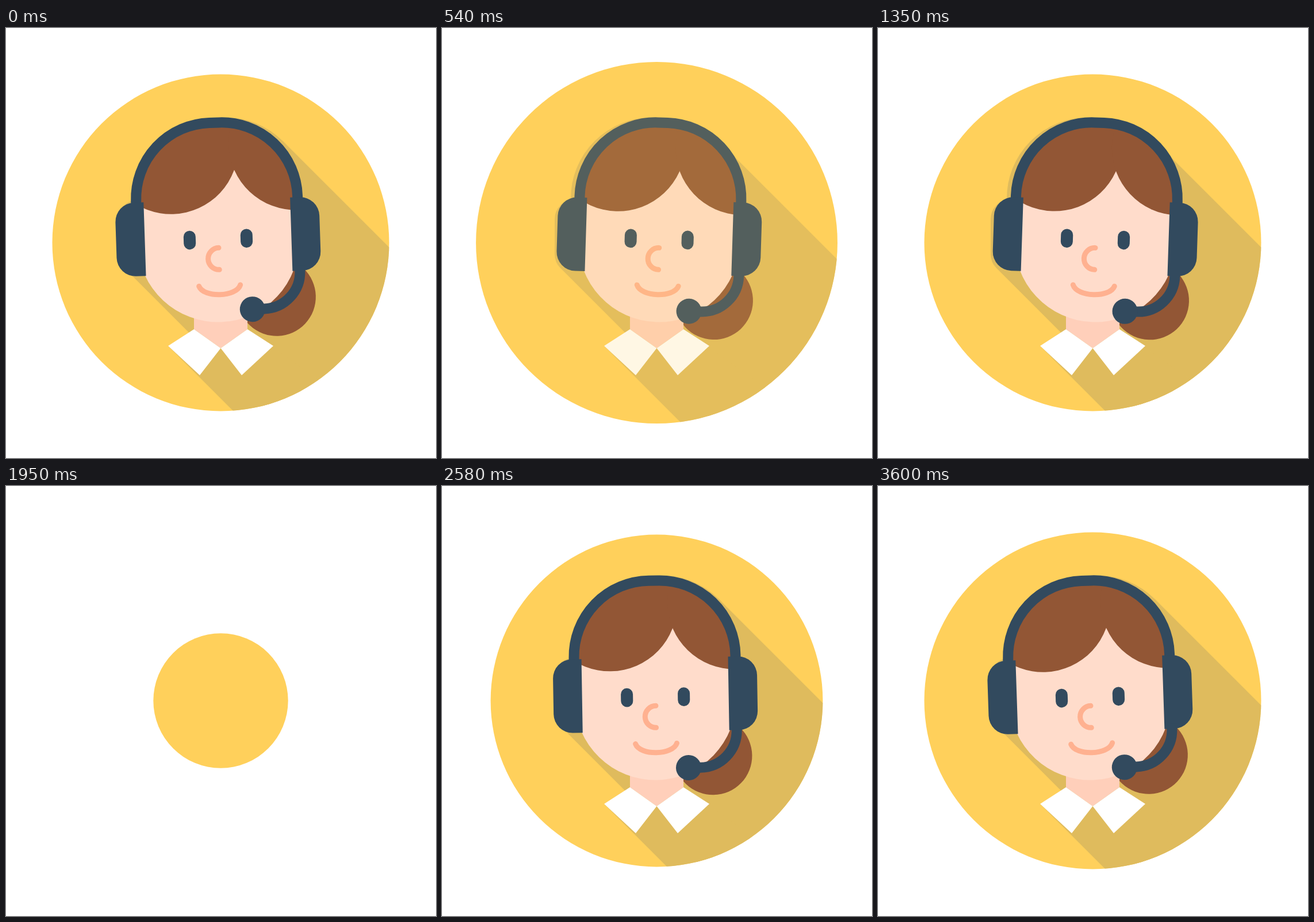
An HTML page with a canvas for the animation above (3.63 s loop, 748x748 px).

```html
<!DOCTYPE html>
<html lang="en">
<head>
<meta charset="utf-8">
<title>Support agent</title>
<style>
  html, body { margin: 0; width: 100%; height: 100%; overflow: hidden; background: #fff; }
  canvas { display: block; width: 748px; height: 748px; }
</style>
</head>
<body>
<canvas id="stage" width="748" height="748"></canvas>
<script>
const SIZE = 748, LOOP = 3630, CYCLE = 1800, STEP = 30;
const CX = 373.5, CY = 373.5, RADIUS = 293;
const NECK_PIVOT = 503, SWAY = 1.95 * Math.PI / 180;
const COLOR = {
  disc: '#ffd05b', shade: '#dfbb5d', skin: '#ffdccb', neck: '#ffcfba',
  blush: '#ffb190', hair: '#925635', navy: '#324a5e', white: '#fff'
};

const stage = document.getElementById('stage').getContext('2d');
const layer = document.createElement('canvas');
layer.width = layer.height = SIZE;
const g = layer.getContext('2d');

function circle(ctx, x, y, r, color) {
  ctx.beginPath();
  ctx.arc(x, y, r, 0, Math.PI * 2);
  ctx.fillStyle = color;
  ctx.fill();
}

function polygon(color, ...points) {
  g.beginPath();
  points.forEach(([x, y]) => g.lineTo(x, y));
  g.fillStyle = color;
  g.fill();
}

function stroke(color, width, cap, trace) {
  g.beginPath();
  trace();
  g.strokeStyle = color;
  g.lineWidth = width;
  g.lineCap = cap;
  g.stroke();
}

function traceBand(bottom) {
  g.moveTo(233, bottom);
  g.arc(365, 296.5, 132, Math.PI, Math.PI * 1.5);
  g.arc(382, 296.5, 132, Math.PI * 1.5, Math.PI * 2);
  g.lineTo(514, bottom);
}

function traceHead() {
  g.beginPath();
  traceBand(371);
  g.arc(CX, 371, 140.5, 0, Math.PI);
  g.closePath();
}

function earCups(color) {
  g.fillStyle = color;
  g.beginPath();
  g.roundRect(196, 299, 50, 128, [33, 0, 0, 33]);
  g.roundRect(501, 299, 50, 128, [0, 33, 33, 0]);
  g.fill();
}

function band(color) {
  stroke(color, 18, 'butt', () => traceBand(304));
}

// Silhouette at rest, stretched diagonally and cut off by the disc.
function drawShadow(radius) {
  g.save();
  g.beginPath();
  g.arc(CX, CY, radius, 0, Math.PI * 2);
  g.clip();
  traceHead();
  g.fillStyle = COLOR.shade;
  g.fill();
  band(COLOR.shade);
  earCups(COLOR.shade);
  polygon(COLOR.shade, [481.7, 196.8], [981.7, 696.8], [705.7, 917.3], [205.7, 417.3]);
  polygon(COLOR.shade, [282, 553], [782, 1053], [950, 900], [420, 524]);
  g.restore();
}

function drawFace() {
  traceHead();
  g.fillStyle = COLOR.skin;
  g.fill();
  g.save();
  g.clip();
  circle(g, 297, 204, 117, COLOR.hair);
  circle(g, 514, 204, 117, COLOR.hair);
  g.restore();

  for (const x of [324, 423]) {
    stroke(COLOR.navy, 21, 'round', () => {
      g.moveTo(x, 361.5);
      g.lineTo(x, 373.2);
    });
  }
  stroke(COLOR.blush, 9, 'round', () =>
    g.arc(374, 401.3, 19, -Math.PI / 2, Math.PI / 2, true));
  stroke(COLOR.blush, 9, 'round', () => {
    g.moveTo(337.5, 448);
    g.bezierCurveTo(345, 469, 402, 469, 409.5, 448);
  });
}

function drawHeadset() {
  band(COLOR.navy);
  earCups(COLOR.navy);
  stroke(COLOR.navy, 18, 'butt', () => {
    g.moveTo(514, 418);
    g.arc(450, 427, 64, 0, Math.PI / 2);
    g.lineTo(430, 491);
  });
  circle(g, 429.2, 491, 22, COLOR.navy);
}

function drawFigure(radius, angle) {
  g.clearRect(0, 0, SIZE, SIZE);
  drawShadow(radius);

  const rotate = draw => {
    g.save();
    g.translate(CX, NECK_PIVOT);
    g.rotate(angle);
    g.translate(-CX, -NECK_PIVOT);
    draw();
    g.restore();
  };
  rotate(() => circle(g, 472, 471, 68, COLOR.hair));
  polygon(COLOR.neck, [327, 480], [420, 480], [420, 524], [CX, 557], [327, 524]);
  polygon(COLOR.white, [282, 553], [327, 524], [CX, 557], [337, 604]);
  polygon(COLOR.white, [465, 553], [420, 524], [CX, 557], [410, 604]);
  rotate(() => {
    drawFace();
    drawHeadset();
  });
}

const clamp = v => Math.min(1, Math.max(0, v));
const smooth = u => u * u * (3 - 2 * u);
const ease = (age, start, end, from, to) =>
  from + (to - from) * smooth(clamp((age - start) / (end - start)));

// Steady growth that runs past full size, dips below it and settles.
function popScale(age) {
  if (age < 300) return age / 300;
  if (age < 420) {
    const u = (age - 300) / 120;
    return 1 + 0.4 * u * (1 - u) ** 2 + 0.125 * smooth(u);
  }
  if (age < 643) return ease(age, 420, 643, 1.125, 0.98);
  return ease(age, 643, 937, 0.98, 1);
}

function render(time) {
  const t = Math.floor((time % LOOP) / STEP) * STEP;
  const age = (t - STEP + CYCLE) % CYCLE;
  const radius = RADIUS * popScale(age);
  const angle = -SWAY * Math.cos(age / 900 * Math.PI * 2);
  const opacity = clamp((age - 360) / 180);

  stage.fillStyle = COLOR.white;
  stage.fillRect(0, 0, SIZE, SIZE);
  circle(stage, CX, CY, radius, COLOR.disc);
  if (opacity > 0) {
    drawFigure(radius, angle);
    stage.globalAlpha = opacity;
    stage.drawImage(layer, 0, 0);
    stage.globalAlpha = 1;
  }
}

const start = performance.now();
function tick() {
  render(performance.now() - start);
  requestAnimationFrame(tick);
}
tick();
</script>
</body>
</html>
```
